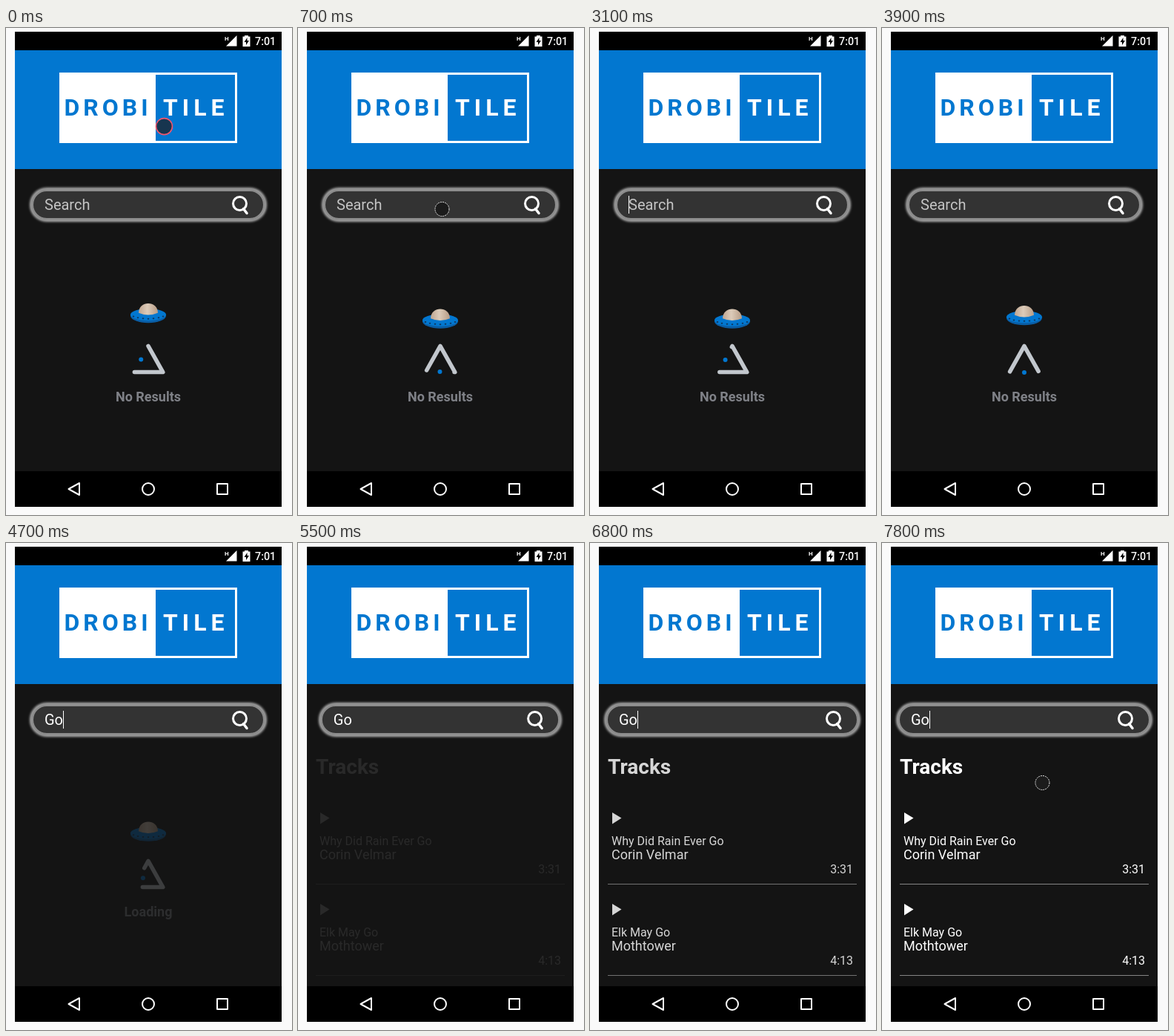
These frames come from a looping animation (386 by 656 pixels, 8000 ms). An HTML page:

```html
<!DOCTYPE html>
<html lang="en">
<head>
<meta charset="utf-8">
<title>Music search</title>
<style>
  html, body { margin: 0; width: 386px; height: 656px; overflow: hidden; background: #fafafa; }
  svg { display: block; font-family: Roboto, "Open Sans", sans-serif; }
  .bold { font-weight: 700; }
  .white { fill: #fff; }
  .line { fill: none; stroke: #fff; stroke-width: 2; stroke-linejoin: round; }
  .logo { font-size: 32px; font-weight: 700; }
  .tri { fill: none; stroke: #c2c7cd; stroke-width: 10; stroke-linecap: round;
         stroke-linejoin: round; stroke-dasharray: 145 76 145 76; }
</style>
</head>
<body>
<svg width="386" height="656" viewBox="0 0 386 656">
  <defs>
    <filter id="glow" x="-10%" y="-50%" width="120%" height="200%"><feGaussianBlur stdDeviation="1.8"/></filter>
    <linearGradient id="dome" x1="0" y1="0" x2="1" y2="0">
      <stop offset="0" stop-color="#bfa590"/><stop offset=".45" stop-color="#dccbb9"/><stop offset="1" stop-color="#b79c86"/>
    </linearGradient>
  </defs>

  <rect x="12" y="5" width="360" height="640" fill="#141414"/>
  <rect x="12" y="5" width="360" height="25"/>
  <rect x="12" y="597" width="360" height="48"/>

  <g class="white">
    <text x="295" y="16.5" font-size="8" class="bold">H</text>
    <path d="M311.500 10V24.500H297Z"/>
    <path d="M322 10h5v1.500h2.500V25h-10V11.500H322Z"/>
    <path d="M325.500 13l-4 6h2.500v4l4-6h-2.500Z" fill="#000"/>
    <text x="336" y="23" font-size="14.300" font-weight="500">7:01</text>
  </g>

  <rect x="12" y="30" width="360" height="160" fill="#0277d0"/>
  <rect x="72" y="60" width="240" height="95" fill="#fff"/>
  <rect x="202" y="63" width="107" height="89" fill="#0277d0"/>
  <text class="logo" x="78.500" y="118" letter-spacing="5" fill="#0277d0">DROBI</text>
  <text class="logo white" x="212" y="118" letter-spacing="6">TILE</text>

  <g class="line">
    <path d="M84.500 621L99 613v16Z"/>
    <circle cx="192" cy="621" r="8"/>
    <rect x="285" y="614" width="14" height="14"/>
  </g>

  <g id="bar">
    <rect class="pill" y="217" height="42" rx="21" fill="none" stroke="#b0b0b0" stroke-width="4" filter="url(#glow)"/>
    <rect class="pill" y="219" height="38" rx="19" fill="#333" stroke="#8c8c8c" stroke-width="2"/>
  </g>
  <text id="query" y="245" font-size="20"></text>
  <rect id="caret" y="226" width="1" height="24" fill="#fff"/>
  <g id="lens" fill="none" stroke="#fff" stroke-width="3" stroke-linecap="round">
    <circle cx="315.500" cy="236.500" r="9"/><path d="M320.500 243.500l4.500 6" stroke-width="3.500"/>
  </g>

  <g id="status">
    <g id="ufo">
      <ellipse cx="192" cy="17" rx="24" ry="9.500" fill="#0a5ea6"/>
      <ellipse cx="192" cy="15.500" rx="24" ry="8" fill="#0277d0"/>
      <path d="M179 13C179-4 205-4 205 13Q192 18.500 179 13Z" fill="url(#dome)"/>
      <g id="lamps" fill="#10355c"></g>
    </g>
    <svg x="168" y="424" width="48" height="44" viewBox="0 0 86 80"><polygon id="tri" class="tri" points="43 8 79 72 7 72"/></svg>
    <circle id="dot" r="3" fill="#0277d0"/>
    <text id="label" class="bold" x="192" y="503" font-size="18" text-anchor="middle" fill="#7f8187"></text>
  </g>

  <g id="results" class="white">
    <text class="bold" x="24" y="311" font-size="28">Tracks</text>
  </g>

  <circle id="pointer" stroke-width="1"/>
</svg>
<script>
const LOOP = 8000;
const CLICK = 860, TYPE_G = 4300, TYPE_O = 4550, FOUND = 5350;
const TRACKS = [
  ["Why Did Rain Ever Go", "Corin Velmar", "3:31"],
  ["Elk May Go", "Mothtower", "4:13"],
];
// time, x, y
const ENTER = [[0, 213.5, 132.5], [550, 194.5, 244], [1000, 194.5, 244], [1400, 255, 190]];
const RETURN = [[7150, 377, 175], [7700, 216.5, 323]];

const $ = id => document.getElementById(id);
const mix = (a, b, k) => a + (b - a) * k;
const clamp = v => Math.min(1, Math.max(0, v));
const show = (el, on) => el.setAttribute("visibility", on ? "visible" : "hidden");

function set(el, attrs) {
  for (const k in attrs) el.setAttribute(k, attrs[k]);
}

function bezier(x1, y1, x2, y2) {
  const at = (a, b, u) => 3 * a * u * (1 - u) ** 2 + 3 * b * u * u * (1 - u) + u ** 3;
  return x => {
    if (x <= 0 || x >= 1) return clamp(x);
    let lo = 0, hi = 1;
    for (let i = 0; i < 24; i++) {
      const mid = (lo + hi) / 2;
      if (at(x1, x2, mid) < x) lo = mid; else hi = mid;
    }
    return at(y1, y2, lo);
  };
}
const ease = bezier(.25, .1, .25, 1);
const snap = bezier(.785, .135, .15, .86);

$("lamps").innerHTML = [-20, -14, -7, 0, 7, 14, 20].map(x => {
  const y = 14 + 7 * Math.sqrt(1 - (x / 24) ** 2);
  return `<ellipse cx="${192 + x}" cy="${y}" rx="1.300" ry="1"/>`;
}).join("");

$("results").innerHTML += TRACKS.map(([title, artist, time], i) => `
  <g transform="translate(0 ${i * 123})">
    <path d="M30 363l12.500 7.500L30 378.500Z"/>
    <text x="29" y="407" font-size="16">${title}</text>
    <text x="29" y="426" font-size="18">${artist}</text>
    <text x="355" y="445" font-size="16" text-anchor="end">${time}</text>
    <rect x="24" y="459" width="336" height="1" fill="#858585"/>
  </g>`).join("");

function drawStatus(t) {
  show($("status"), t < FOUND);
  const loading = t >= TYPE_G;
  const age = loading ? t - TYPE_G + 20 : t + 100;
  $("label").textContent = loading ? "Loading" : "No Results";
  $("status").setAttribute("opacity", loading ? clamp((t - TYPE_G) / 1750) : 1);

  const half = age % 2400 / 1200;
  const bob = half < 1 ? ease(half) : 1 - ease(half - 1);
  $("ufo").setAttribute("transform", `translate(0 ${370 + 8.8 * bob})`);

  const turn = age % 3000 / 1000;
  const side = Math.floor(turn);
  const k = snap(turn - side);
  const offsets = [0, 74, 147, 221];
  const spots = [[182, 446], [192, 464], [202, 446], [182, 446]];
  $("tri").style.strokeDashoffset = mix(offsets[side], offsets[side + 1], k);
  set($("dot"), {
    cx: mix(spots[side][0], spots[side + 1][0], k),
    cy: mix(spots[side][1], spots[side + 1][1], k),
  });
}

function drawSearch(t) {
  const grow = 13 * ease((t - FOUND) / 720);
  document.querySelectorAll(".pill").forEach((el, i) => {
    const pad = i ? 0 : 2;
    set(el, { x: 36 - pad - grow, width: 312 + 2 * (pad + grow) });
  });
  const typed = t < TYPE_G ? "" : t < TYPE_O ? "G" : "Go";
  const x = 52 - grow;
  $("query").textContent = typed || "Search";
  set($("query"), { x, fill: typed ? "#fff" : "#c4c4c4" });
  $("lens").setAttribute("transform", `translate(${grow} 0)`);

  const since = t >= TYPE_O ? TYPE_O : t >= TYPE_G ? TYPE_G : CLICK;
  show($("caret"), t >= CLICK && (t - since) % 1060 < 530);
  $("caret").setAttribute("x", x + [0, 13.5, 25][typed.length]);
}

function drawPointer(t) {
  const path = t < 4000 ? ENTER : RETURN;
  const last = path[path.length - 1];
  show($("pointer"), t >= path[0][0] && (path === RETURN || t < last[0]));
  let i = 0;
  while (i < path.length - 2 && t >= path[i + 1][0]) i++;
  const [a, b] = [path[i], path[i + 1]];
  const k = ease((t - a[0]) / (b[0] - a[0]));
  const y = mix(a[2], b[2], k);
  const onBlue = y < 185;
  set($("pointer"), {
    cx: mix(a[1], b[1], k), cy: y,
    r: onBlue ? 11 : 9.5,
    fill: onBlue ? "#17354f" : "#1b1b1b",
    stroke: onBlue ? "#f0566e" : "#e6e6e6",
    "stroke-width": onBlue ? 1.6 : 1,
    "stroke-dasharray": onBlue ? "none" : "2 1",
  });
}

function draw(t) {
  drawStatus(t);
  drawSearch(t);
  $("results").setAttribute("opacity", clamp((t - FOUND) / 1750));
  drawPointer(t);
}

const start = performance.now();
function tick() {
  draw((performance.now() - start) % LOOP);
  requestAnimationFrame(tick);
}
tick();
</script>
</body>
</html>
```
